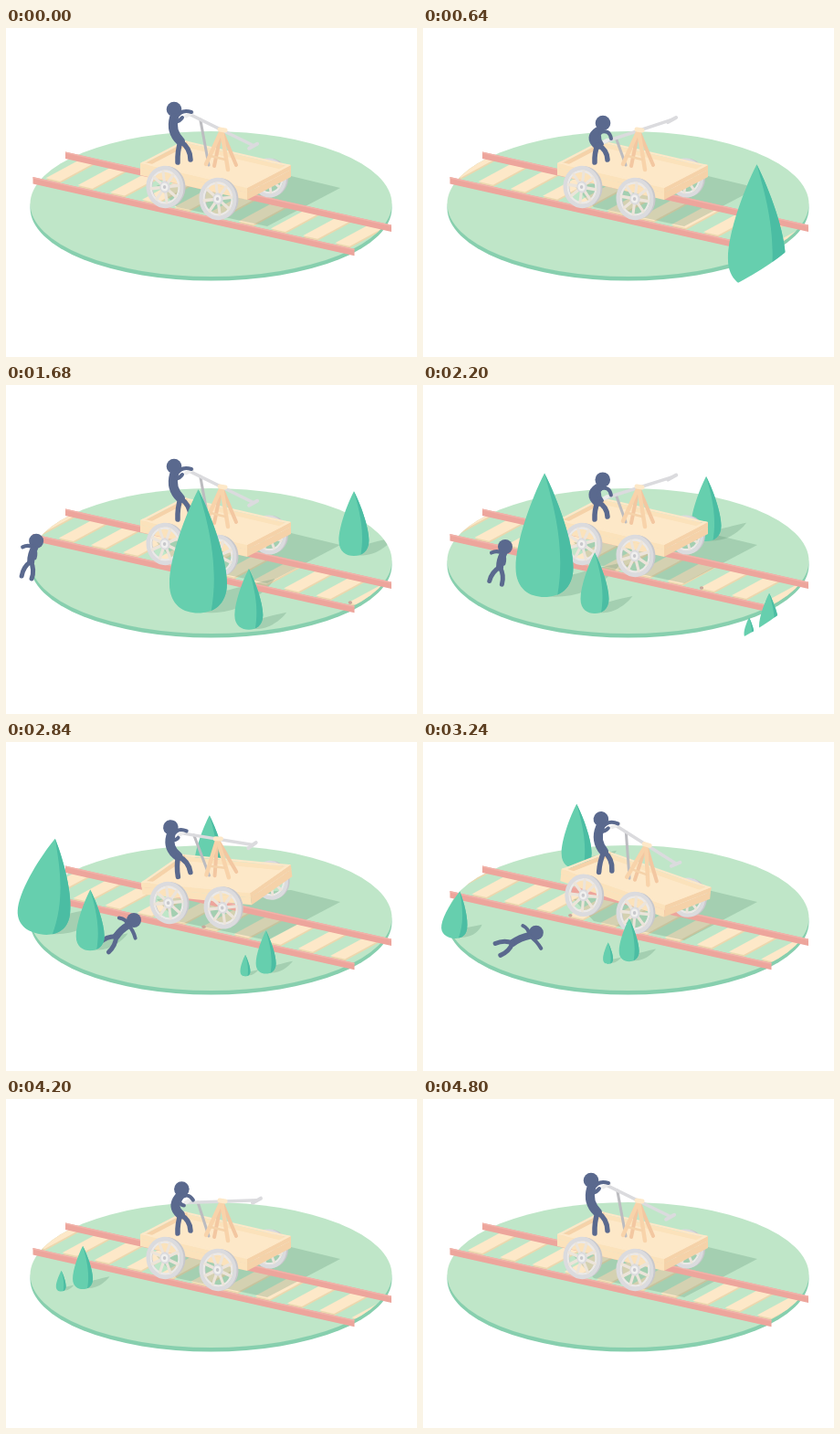
An HTML page with a canvas that plays this animation: 450x360 px, repeating every 4840 ms.

```html
<!DOCTYPE html>
<html lang="en">
<head>
<meta charset="utf-8">
<title>Handcar</title>
<style>
html, body { margin: 0; width: 100%; height: 100%; overflow: hidden; background: #fff; }
canvas { display: block; width: 450px; height: 360px; }
</style>
</head>
<body>
<canvas id="stage" width="450" height="360"></canvas>
<script>
const ctx = document.getElementById('stage').getContext('2d');
const LOOP = 4840, PUMP = 1600, SLOPE = .224;
const TIE_GAP = 35.2, TRACK_SPEED = 19 * TIE_GAP / LOOP;
const NAVY = '#5a698e', RAIL = '#eda59c', STEEL = '#dbdbde', STEEL_DARK = '#c8c8cc';
const TOP = '#fde8c8', FRONT = '#fbe2bb', SIDE = '#f5d2a9', SHADE = 'rgba(75,130,100,.23)';

const clamp = v => Math.max(0, Math.min(1, v));
const lerp = (a, b, u) => a + (b - a) * u;
const mix = (p, q, u) => [lerp(p[0], q[0], u), lerp(p[1], q[1], u)];
const add = (p, dx, dy) => [p[0] + dx, p[1] + dy];
const polar = (p, angle, r) => add(p, r * Math.cos(angle), r * Math.sin(angle));
const ease = u => (1 - Math.cos(Math.PI * clamp(u))) / 2;
const pulse = (t, start, end) => Math.sin(Math.PI * clamp((t - start) / (end - start))) ** 2;

function poly(color, ...points) {
  ctx.fillStyle = color;
  ctx.beginPath();
  points.forEach(p => ctx.lineTo(...p));
  ctx.fill();
}

// A round-ended stroke; bend pushes its middle sideways.
function limb(color, width, a, b, bend = 0) {
  const angle = Math.atan2(b[1] - a[1], b[0] - a[0]) + Math.PI / 2;
  ctx.strokeStyle = color;
  ctx.lineWidth = width;
  ctx.lineCap = 'round';
  ctx.beginPath();
  ctx.moveTo(...a);
  ctx.quadraticCurveTo(...polar(mix(a, b, .5), angle, 2 * bend), ...b);
  ctx.stroke();
}

function dot(color, x, y, rx, ry = rx) {
  ctx.fillStyle = color;
  ctx.beginPath();
  ctx.ellipse(x, y, rx, ry, 0, 0, 7);
  ctx.fill();
}

function clipped(path, draw) {
  ctx.save();
  ctx.beginPath();
  path();
  ctx.clip();
  draw();
  ctx.restore();
}

// ---- ground ----
const DISC = [224.5, 192.5, 198, 79.5];
const discPath = () => ctx.ellipse(...DISC, 0, 0, 7);

function ground() {
  const [x, y, rx, ry] = DISC;
  dot('#87cfae', x, y + 4.5, rx, ry);
  dot('#bfe6c8', x, y, rx, ry);
}

function ties(t) {
  const across = [18.5, -10], along = [8, 8 * SLOPE];
  for (let k = -1; k < 12; k++) {
    const dx = TIE_GAP * k - TRACK_SPEED * t % TIE_GAP;
    const center = [70 + dx, 156 + SLOPE * dx];
    const corner = (i, j) => add(center, i * across[0] + j * along[0], i * across[1] + j * along[1]);
    const quad = [corner(-1, -1), corner(-1, 1), corner(1, 1), corner(1, -1)];
    poly('#ecd7ae', ...quad.map(p => add(p, 0, 2)));
    poly(TOP, ...quad);
  }
}

function rail(x, y, length) {
  const a = [x, y], b = [x + length, y + SLOPE * length];
  poly(RAIL, a, b, add(b, 0, 7.5), add(a, 0, 7.5));
  poly('#f1b3aa', a, b, add(b, 0, 1.5), add(a, 0, 1.5));
}

function rock(t) {
  const dx = TRACK_SPEED * (2200 - t);
  if (dx > -200 && dx < 90) dot('#c9a89a', 305 + dx, 222 + SLOPE * dx, 2.2, 1.8);
}

// ---- trees ----
// Base position at 2200 ms and width; the lane sets speed and exit.
const trees = [[310, 171, 33], [133, 232, 63], [188, 250, 31], [379, 275, 22], [357, 278, 11]]
  .map(([x, y, w]) => {
    const lane = y - SLOPE * x;
    return { x, y, w, h: 2.15 * w, far: lane < 150, speed: .1237 + .000125 * lane, exit: 70 + .9 * (200 - lane) };
  });

function teardrop(w, h) {
  ctx.beginPath();
  for (const side of [1, -1]) {
    ctx.moveTo(0, -h);
    ctx.bezierCurveTo(side * .22 * w, -.8 * h, side * .5 * w, -.45 * h, side * .5 * w, -.24 * h);
    ctx.bezierCurveTo(side * .5 * w, -.06 * h, side * .25 * w, 0, 0, 0);
  }
}

function place(tree, t) {
  const dx = tree.speed * (2200 - t), x = tree.x + dx;
  const fold = Math.max(0, (tree.exit - x) / 65) ** 2;
  return { x, y: tree.y + .227 * dx, fold, visible: fold < 1 && x < 480 };
}

function treeShadow(tree, t) {
  const { x, y, fold, visible } = place(tree, t);
  if (!visible) return;
  ctx.save();
  ctx.transform(.8, .1, -.62 * (1 - fold), .27 * (1 - fold), x, y - 1);
  teardrop(tree.w, tree.h);
  ctx.fillStyle = SHADE;
  ctx.fill();
  ctx.restore();
}

// Trees rise past a curve just outside the disc.
function horizon() {
  ctx.moveTo(0, 0);
  ctx.lineTo(437, 0);
  ctx.lineTo(437, 180);
  ctx.quadraticCurveTo(435, 233, 337, 283);
  ctx.lineTo(290, 300);
  ctx.lineTo(0, 300);
}

function drawTree(tree, t) {
  const { x, y, fold, visible } = place(tree, t), { w, h } = tree;
  if (!visible) return;
  clipped(horizon, () => {
    ctx.translate(x, y);
    ctx.rotate(.7 * fold);
    ctx.scale(1 - .4 * fold, 1 - fold);
    teardrop(w, h);
    ctx.fillStyle = '#66cfae';
    ctx.fill();
    ctx.clip();
    ctx.beginPath();
    ctx.moveTo(0, -h);
    ctx.bezierCurveTo(.15 * w, -.75 * h, .38 * w, -.4 * h, .22 * w, 0);
    ctx.lineTo(w, 0);
    ctx.lineTo(w, -h);
    ctx.fillStyle = '#4bbda3';
    ctx.fill();
  });
}

// ---- people ----
function pumper(level) {
  const up = (level + 1) / 2;
  const head = mix([197, 104], [184, 89], up);
  const neck = add(head, lerp(-5, 0, up), 9), hip = [191, lerp(128, 124, up)];
  const hand = add(head, lerp(9, 19), lerp(17, 3, up));
  hand[0] = head[0] + lerp(9, 19, up);
  dot(NAVY, ...head, 8.3);
  limb(NAVY, 10, neck, hip, lerp(5, 4, up));
  limb(NAVY, 4, add(neck, 2, 1), hand, -4);
  limb(NAVY, 4, add(neck, 1, 5), add(hand, -10, 6), 1);
  limb(NAVY, 5.5, hip, [188, 147], 1);
  limb(NAVY, 5.5, hip, [202, 144], -3);
}

// [time, head x, head y]
const RUN_PATH = [[1450, 8, 168], [2200, 90, 177], [2840, 140, 195], [3100, 143, 213], [4450, -42, 171]];

function runner(t) {
  const next = RUN_PATH.findIndex(key => key[0] > t);
  if (next < 1) return;
  const [t0, ...from] = RUN_PATH[next - 1], [t1, ...to] = RUN_PATH[next];
  const head = mix(from, to, (t - t0) / (t1 - t0));
  const fallen = ease((t - 2400) / 750), lean = 1.83 + .9 * fallen;
  const stride = t < 2400 ? .38 * Math.cos((t - 2200) / 75) : .38;
  const neck = polar(head, lean, 8), hip = polar(head, lean, lerp(23, 28, fallen));
  clipped(() => ctx.rect(12, 0, 438, 360), () => {
    dot(NAVY, ...head, 8);
    limb(NAVY, 8, neck, hip, 1);
    limb(NAVY, 4, neck, polar(neck, lean + 1.4, 13), 2);
    limb(NAVY, 4, neck, polar(neck, lean - lerp(.3, 1.9, fallen), lerp(11, 19, fallen)), -1);
    for (const side of [1, -1]) limb(NAVY, 5, hip, polar(hip, lean + side * stride, 19), 2 * side);
  });
}

// ---- handcar ----
// Cart space: u along the track, v across it, z up.
const cartPoint = (u, v, z) => [147 + 117 * u + 48 * v, 148 + 27 * u - 25 * v - z];

function box(u0, u1, v0, v1, z0, z1) {
  const P = cartPoint;
  poly(FRONT, P(u0, v0, z0), P(u1, v0, z0), P(u1, v0, z1), P(u0, v0, z1));
  poly(SIDE, P(u1, v0, z0), P(u1, v1, z0), P(u1, v1, z1), P(u1, v0, z1));
  poly(TOP, P(u0, v0, z1), P(u1, v0, z1), P(u1, v1, z1), P(u0, v1, z1));
}

function wheel(x, y, turn, size = 1) {
  ctx.save();
  ctx.translate(x, y);
  ctx.rotate(-.12);
  ctx.scale(.88 * size, size);
  const ring = (color, dx, r, width) => {
    ctx.strokeStyle = color;
    ctx.lineWidth = width;
    ctx.beginPath();
    ctx.arc(dx, 0, r, 0, 7);
    ctx.stroke();
  };
  ring(STEEL_DARK, 3, 20.5, 4);
  ring(STEEL, 0, 21, 4.5);
  ring('#ebe9e8', 0, 17.5, 2.5);
  for (let k = 0; k < 8; k++) {
    const angle = turn + k * Math.PI / 4;
    limb('#ece4da', 3.5, polar([0, 0], angle, 4), polar([0, 0], angle, 17));
  }
  dot(STEEL, 0, 0, 6.5);
  dot('#f0efee', -.5, 0, 4.5);
  dot(STEEL_DARK, -.5, 0, 2);
  ctx.restore();
}

function pumpLevel(t) {
  const p = t % PUMP / PUMP;
  return p < .4 ? 1 - 2 * ease((p - .12) / .28) : 2 * ease((p - .4) / .55) - 1;
}

function lever(level) {
  const angle = Math.atan(.08 + .41 * level), at = d => polar([237, 112], angle, d);
  limb('#bcbcc0', 3, at(-27), [222, 150]);
  limb(STEEL, 3.5, at(-40), at(38));
  limb(STEEL, 4, add(at(38), -5, 3), add(at(38), 4, -2));
  limb('#ececec', 4, add(at(-40), -4, 2), add(at(-40), 3, -2));
}

function cart(t) {
  const front = pulse(t, 2700, 2990), rear = pulse(t, 3090, 3370);
  const turn = 12 * Math.PI * t / LOOP, level = pumpLevel(t);
  const wheels = [[174, 174], [232, 187]], tilt = [-.13 * front, .11 * rear];
  ctx.save();
  ctx.translate(4 * front, 2 * front);
  wheels.forEach(([x, y], i) => {
    ctx.translate(x, y);
    ctx.rotate(tilt[i]);
    ctx.translate(-x, -y);
  });
  wheel(288, 164, turn, .93);

  const floor = -5;
  box(0, 1, 0, 1, -13, floor);
  box(0, 1, .94, 1, floor, 0);
  box(0, .03, 0, 1, floor, 0);
  box(0, 1, 0, .06, floor, 0);
  box(.97, 1, 0, 1, floor, 0);

  const apex = [236, 112];
  limb('#f3c7a1', 4, apex, [252, 150]);
  limb('#f3c7a1', 4, apex, [228, 151]);
  lever(level);
  pumper(level);
  limb('#f8d3aa', 4.5, apex, [219, 149]);
  limb('#f8d3aa', 4.5, apex, [243, 155]);
  limb(SIDE, 2.5, [224, 140], [240, 144]);
  limb(TOP, 5, add(apex, -2, -1), add(apex, 4, 0));

  wheels.forEach(p => wheel(...p, turn));
  ctx.restore();
}

function cartShadow() {
  poly(SHADE, [165, 172], [312, 162], [366, 175], [286, 217], [187, 196]);
}

function render(t) {
  ctx.clearRect(0, 0, 450, 360);
  ground();
  clipped(discPath, () => {
    ties(t);
    cartShadow();
    trees.forEach(tree => treeShadow(tree, t));
  });
  rail(65, 135.5, 357);
  rail(29.5, 163, 352);
  clipped(discPath, () => rock(t));
  trees.filter(tree => tree.far).forEach(tree => drawTree(tree, t));
  cart(t);
  runner(t);
  trees.filter(tree => !tree.far).forEach(tree => drawTree(tree, t));
}

const start = performance.now();
function frame() {
  const t = (performance.now() - start) % LOOP;
  render(Math.floor(t / 40) * 40);
  requestAnimationFrame(frame);
}
render(0);
requestAnimationFrame(frame);
</script>
</body>
</html>
```
